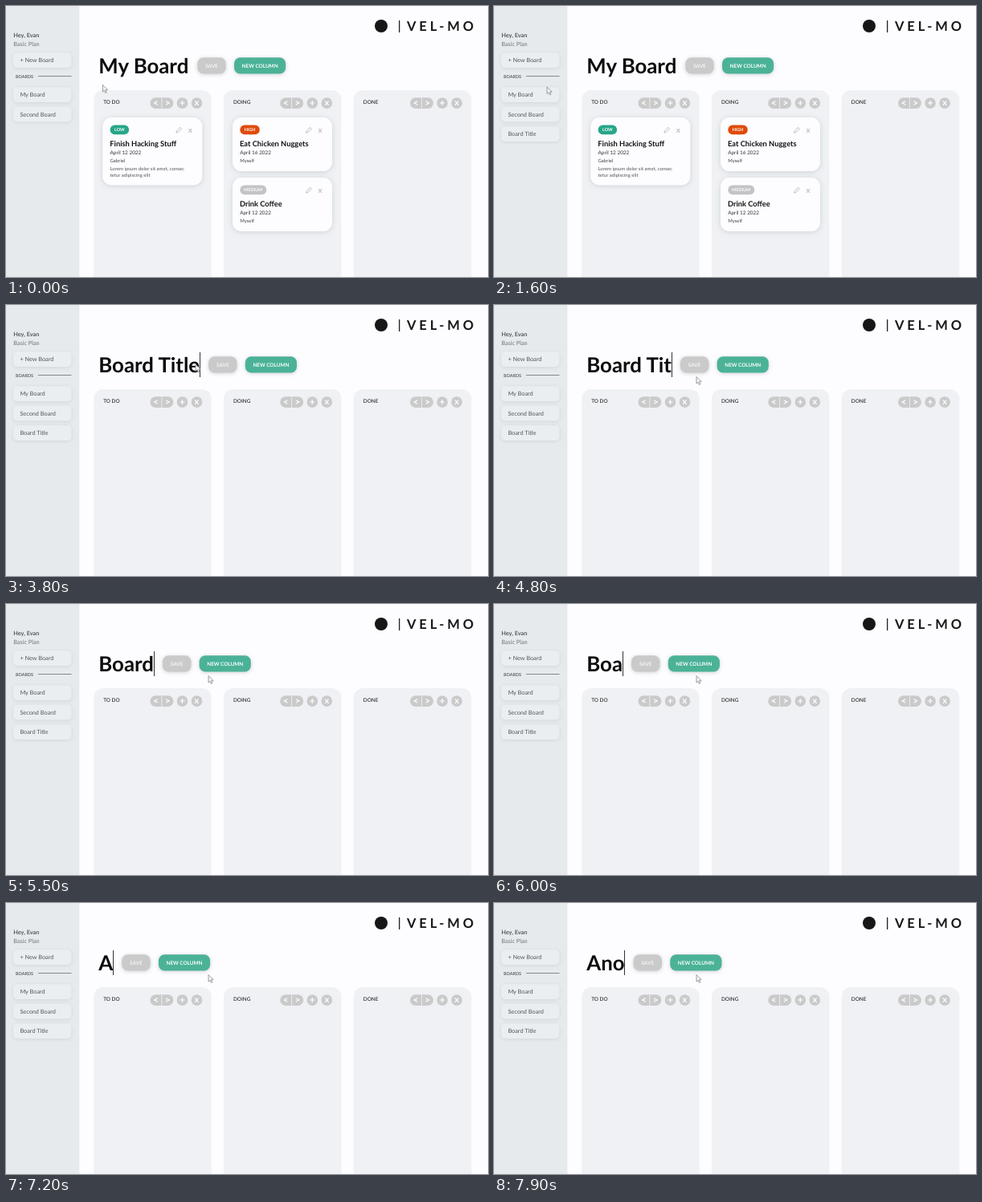
These frames come from a looping animation (600 px wide and 338 px high, 8000 ms). An HTML page:

```html
<!DOCTYPE html>
<html lang="en">
<head>
<meta charset="utf-8">
<title>Task board</title>
<style>
html, body { margin: 0; width: 100%; height: 100%; overflow: hidden; background: #fdfcff; }
svg { display: block; width: 600px; height: 338px; }
text { font-family: Lato, sans-serif; white-space: pre; text-rendering: geometricPrecision; }
.soft { filter: drop-shadow(0 1px 2px rgba(90, 100, 115, .14)); }
.lift { filter: drop-shadow(0 1px 2.5px rgba(0, 0, 0, .17)); }
.card { filter: drop-shadow(0 1px 3px rgba(60, 65, 80, .17)); }
</style>
</head>
<body>
<svg id="stage" viewBox="0 0 600 338"></svg>
<script>
const LOOP = 8000, TITLE_X = 115.3;
const GREY = '#cacacb', SIDE = '#eaeef0';

const rect = (x, y, w, h, r, fill, more = '') =>
  `<rect x="${x}" y="${y}" width="${w}" height="${h}" rx="${r}" fill="${fill}" ${more}/>`;
const text = (x, y, size, str, fill = '#333', weight = 400, more = '') =>
  `<text x="${x}" y="${y}" font-size="${size}" fill="${fill}" font-weight="${weight}" ${more}>${str}</text>`;
const mid = (x, y, size, str, fill = '#fff', weight = 700) =>
  text(x, y, size, str, fill, weight, 'text-anchor="middle"');
const group = (id, x, y, body) => `<g id="${id}" transform="translate(${x} ${y})">${body}</g>`;

const sideButton = (id, y, label) => `<g id="${id}">` +
  rect(9, y, 72.5, 18.8, 5, SIDE, 'class="soft"') +
  text(17.4, y + 12.2, 7.3, label, '#5f6367', 500) + '</g>';

function column(x, label) {
  const glyphs = [[77.3, '&lt;'], [92, '&gt;'], [110.3, '+'], [128.3, 'x']];
  return group('', x, 105,
    rect(0, 0, 146.5, 260, 12, '#eff1f4') +
    text(12, 16.6, 6.4, label, '#222', 500) +
    rect(70.2, 9.2, 29, 13.8, 6.9, GREY) +
    rect(84.3, 9.2, .8, 13.8, 0, '#f1f2f4') +
    [110.3, 128.3].map(cx => `<circle cx="${cx}" cy="16.1" r="6.8" fill="${GREY}"/>`).join('') +
    glyphs.map(([gx, s]) => mid(gx, s === 'x' ? 19.3 : 20, s === 'x' ? 11 : 12, s)).join(''));
}

function card(x, y, h, tag, color, tagW, title, date, owner, notes = []) {
  return group('', x, y,
    rect(0, 0, 124, h, 11, '#fdfcff', 'class="card"') +
    rect(9.3, 9.6, tagW, 11.6, 5.8, color) +
    mid(9.3 + tagW / 2, 17.4, 5.4, tag) +
    '<path d="M91.5 19.2l.8-2.5 4.3-4.3 1.7 1.7-4.3 4.3z" fill="none" stroke="#aeb0b3" stroke-width=".8"/>' +
    mid(109, 18.8, 10, 'x', '#c0c1c4') +
    text(9, 35.5, 9.3, title, '#111', 700) +
    text(9.2, 46, 6.4, date, '#333') +
    text(9.2, 56.3, 6, owner, '#444') +
    notes.map((s, i) => text(9.2, 66 + i * 8, 6, s, '#555')).join(''));
}

stage.innerHTML =
  rect(0, 0, 600, 338, 0, '#fdfcff') +
  rect(0, 0, 91.3, 338, 0, '#e6eaec') +
  text(9.3, 39.3, 7.3, 'Hey, Evan', '#55595d', 700) +
  text(9.3, 49.6, 7.3, 'Basic Plan', '#707478') +
  sideButton('s0', 58.2, '+ New Board') +
  text(12, 89.5, 5.4, 'BOARDS', '#5f6367', 700) +
  rect(40, 87, 41.5, 1, 0, '#85898d') +
  sideButton('s1', 101.2, 'My Board') +
  sideButton('s2', 125.7, 'Second Board') +
  sideButton('s3', 150.2, 'Board Title') +
  '<circle cx="467" cy="25" r="8" fill="#161616"/>' +
  rect(489, 18, 1.3, 15, 0, '#222') +
  text(499, 31, 16.5, 'VEL-MO', '#161616', 700, 'letter-spacing="3.9"') +
  column(109.2, 'TO DO') + column(271, 'DOING') + column(432.8, 'DONE') +
  group('cards', 0, 0,
    card(120.3, 139, 84.5, 'LOW', '#27a688', 23.5, 'Finish Hacking Stuff', 'April 12 2022', 'Gabriel',
      ['Lorem ipsum dolor sit amet, consec', 'tetur adipiscing elit']) +
    card(282, 139, 67, 'HIGH', '#df4a0a', 24.5, 'Eat Chicken Nuggets', 'April 16 2022', 'Myself') +
    card(282, 214, 67, 'MEDIUM', '#c3c3c7', 33, 'Drink Coffee', 'April 12 2022', 'Myself')) +
  text(TITLE_X, 83.6, 25.8, '', '#0b0b0c', 700, 'id="heading"') +
  rect(0, 59, 1, 31, 0, '#333', 'id="caret"') +
  group('actions', 0, 0,
    rect(0, 64.2, 35.5, 20.2, 7.5, GREY, 'class="lift"') + mid(17.7, 76.6, 6.4, 'SAVE', '#f4f4f5') +
    rect(45.7, 64.2, 64.2, 20.2, 7.5, '#4bb298', 'class="lift"') + mid(77.8, 76.6, 6.4, 'NEW COLUMN')) +
  group('pointer', 0, 0,
    '<path d="M0 0v8.6l2-1.8 1.4 3.2 1.5-.7-1.4-3.1h2.7z" fill="#f6f6f8" stroke="#85878b" stroke-width=".8"/>');

const $ = id => document.getElementById(id);
const sides = [['s0', 58.2], ['s1', 101.2], ['s2', 125.7], ['s3', 150.2]];

// time, x, y
const path = [[0, 120.5, 98.5], [600, 57, 70], [1350, 57, 70], [1600, 66, 100.8], [2200, 69.6, 160],
  [2800, 69.6, 160], [3500, 121, 80], [3800, 236, 74], [4100, 252, 89.5], [LOOP, 252, 89.5]];

// moments at which one letter is removed or typed
const erase = [4500, 4700, 4900, 5100, 5280, 5450, 5700, 5900, 6150, 6400, 6800];
const type = [7200, 7500, 7800];

function pointerAt(t) {
  const i = path.findIndex(p => p[0] > t);
  const [t0, x0, y0] = path[i - 1], [t1, x1, y1] = path[i];
  const k = (t - t0) / (t1 - t0);
  return [x0 + (x1 - x0) * k, y0 + (y1 - y0) * k];
}

function titleAt(t) {
  const done = list => list.filter(s => s <= t).length;
  if (t < 2700) return 'My Board';
  if (t < type[0]) return 'Board Title'.slice(0, 11 - done(erase));
  return 'Ano'.slice(0, done(type));
}

function draw(t) {
  const [px, py] = pointerAt(t);
  $('pointer').setAttribute('transform', `translate(${px} ${py})`);
  for (const [id, y] of sides) {
    const hover = px > 9 && px < 81.5 && py > y && py < y + 18.8;
    $(id).firstChild.setAttribute('fill', hover ? '#f4f7f8' : SIDE);
  }
  $('s3').style.display = t < 1100 ? 'none' : '';
  $('cards').style.display = t < 2700 ? '' : 'none';

  const heading = $('heading'), str = titleAt(t);
  if (heading.textContent !== str) heading.textContent = str;
  const end = TITLE_X + (str ? heading.getComputedTextLength() : 0);
  $('actions').setAttribute('transform', `translate(${end + 11} 0)`);
  $('caret').setAttribute('x', Math.round(end - .2));
  $('caret').style.display = t >= 3800 && t < 4300 || t >= 4500 ? '' : 'none';
}

function loop() {
  draw(performance.now() % LOOP);
  requestAnimationFrame(loop);
}
loop();
</script>
</body>
</html>
```
